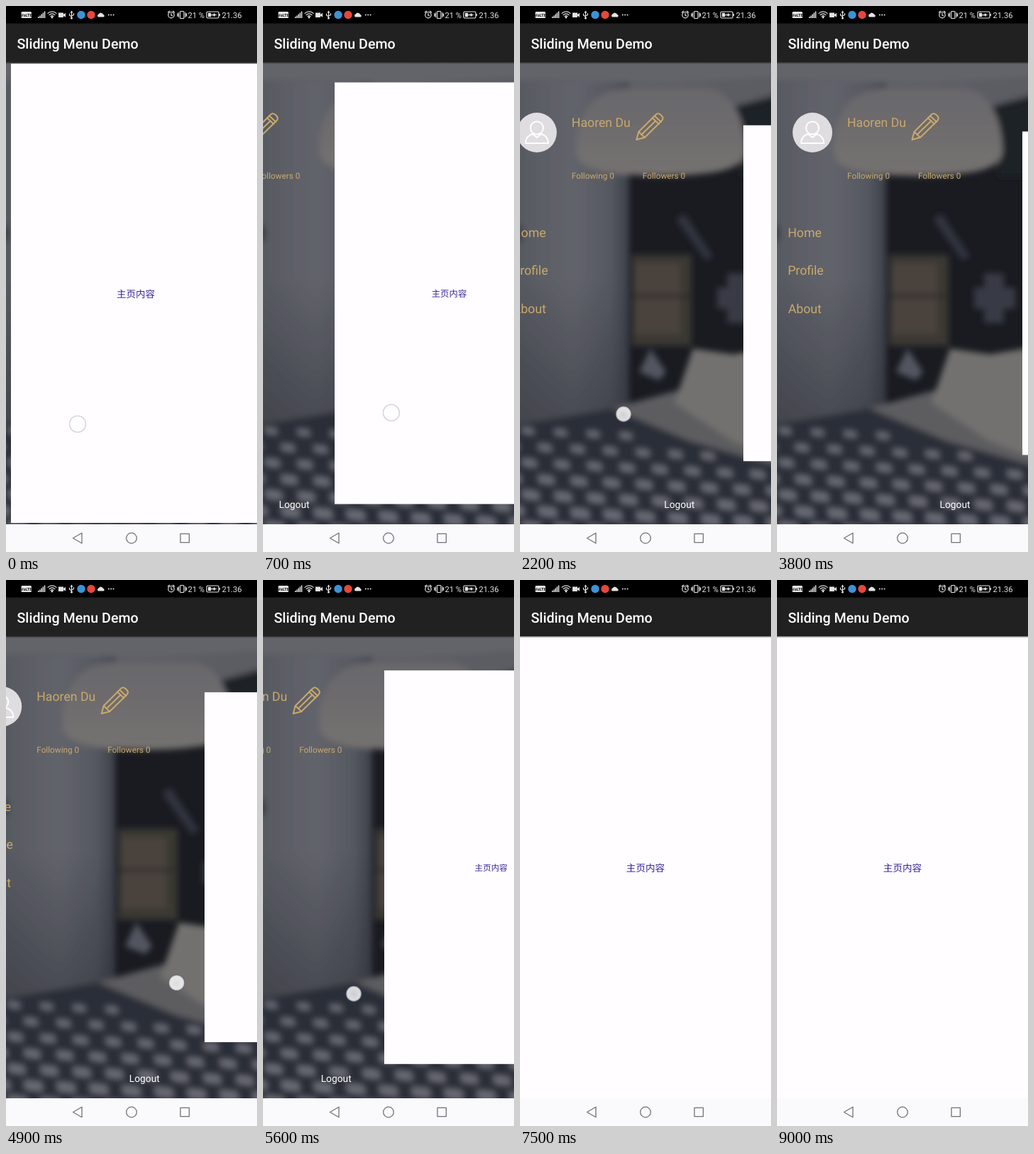
Write an HTML page that moves like this. It is 354 by 768 pixels and loops after 9.1 s.

```html
<!DOCTYPE html>
<html lang="en">
<head>
<meta charset="utf-8">
<title>Sliding Menu Demo</title>
<style>
  html, body { margin: 0; width: 100%; height: 100%; overflow: hidden; background: #000; }
  svg { display: block; width: 100vw; height: 100vh; }
  text { font-family: Roboto, "Noto Sans", sans-serif; text-rendering: geometricPrecision; }
  .gold { fill: #c9a96c; }
  .item { font-size: 17.7px; }
  .small { font-size: 11.8px; }
  .status { font-size: 11.2px; fill: #e4e4e4; }
  .line { fill: none; stroke-linecap: round; stroke-linejoin: round; }
</style>
</head>
<body>
<svg viewBox="0 0 354 768" preserveAspectRatio="none">
  <defs>
    <clipPath id="area"><rect y="79" width="354" height="650"/></clipPath>
    <filter id="soft" x="-10%" y="-10%" width="120%" height="120%"><feGaussianBlur stdDeviation="4"/></filter>
    <linearGradient id="wall">
      <stop offset="0" stop-color="#55575f"/>
      <stop offset=".55" stop-color="#62646b"/>
      <stop offset=".85" stop-color="#555861"/>
      <stop offset="1" stop-color="#3c4049"/>
    </linearGradient>
    <linearGradient id="fall" x2="0" y2="1">
      <stop offset="0" stop-color="#23262e" stop-opacity="0"/>
      <stop offset="1" stop-color="#23262e" stop-opacity=".45"/>
    </linearGradient>
    <linearGradient id="lamp" x2="0" y2="1">
      <stop offset="0" stop-color="#68676b"/>
      <stop offset="1" stop-color="#757270"/>
    </linearGradient>
    <linearGradient id="drop" x2="0" y2="1">
      <stop offset="0" stop-color="#000" stop-opacity=".4"/>
      <stop offset="1" stop-color="#000" stop-opacity="0"/>
    </linearGradient>
    <radialGradient id="spot">
      <stop offset="0" stop-color="#fff" stop-opacity=".76"/>
      <stop offset=".8" stop-color="#fff" stop-opacity=".84"/>
      <stop offset="1" stop-color="#fff" stop-opacity=".6"/>
    </radialGradient>
  </defs>

  <g clip-path="url(#area)">
    <!-- blurred room -->
    <rect y="79" width="354" height="650" fill="#191b21"/>
    <g filter="url(#soft)">
      <path d="M-20 60H374V122L300 142L240 232H-20Z" fill="#5b5c63"/>
      <path d="M-20 60H374V98L200 110L-20 102Z" fill="#63646a"/>
      <path d="M374 124L300 142L312 240H374Z" fill="#1f2128"/>
      <path d="M-20 108H154V600H-20Z" fill="url(#wall)"/>
      <path d="M-20 380H154V610H-20Z" fill="url(#fall)"/>
      <path d="M80 205C78 160 98 118 150 115H262C300 118 318 160 318 205C316 226 290 238 200 239C110 238 82 228 80 205Z" fill="url(#lamp)"/>
      <path d="M220 300L232 292L272 352L262 358Z" fill="#33363f"/>
      <path d="M158 350H242V478H158Z" fill="#3b3733"/>
      <path d="M163 362H226V462H163Z" fill="#48433d"/>
      <path d="M158 408H240" stroke="#292725" stroke-width="4"/>
      <path d="M292 376H320V396H336V426H320V446H292V426H278V396H292Z" fill="#373a44"/>
      <path d="M168 515L184 482L206 515L196 526Z" fill="#535761"/>
      <path d="M130 566L225 540L374 580V660L250 625Z" fill="#5d5d60"/>
      <path d="M218 558L244 482L300 490L374 478V640L300 612Z" fill="#737170"/>
      <path d="M-20 592L130 566L240 612L374 650V750H-20Z" fill="#2c2f38"/>
      <g id="quilt" fill="#696b75"/>
      <ellipse cx="-1" cy="320" rx="4" ry="13" fill="#2d2f36"/>
    </g>

    <g id="menu">
      <circle cx="50" cy="178" r="28" fill="#dfdde0"/>
      <g class="line" stroke="#fff" stroke-width="2">
        <circle cx="50" cy="171.500" r="9"/>
        <path d="M44 180C37 182 34 187 34 193H66C66 187 63 182 56 180L50 185Z"/>
      </g>
      <text class="gold item" x="99" y="170">Haoren Du</text>
      <g class="line" stroke="#c9a96c" stroke-width="2">
        <path d="M190.500 188L193.500 177L217 153.500Q220 149.500 224 152.500L226 154.500Q229.500 158 226 161.500L202 185Z"/>
        <path d="M193.500 177L202 185M213 157.500L222 166M216 154.500L225 163M198 180.500L217.500 161.500"/>
      </g>
      <text class="gold small" x="99" y="243">Following 0</text>
      <text class="gold small" x="199" y="243">Followers 0</text>
      <text class="gold item" x="15.200" y="325">Home</text>
      <text class="gold item" x="15.200" y="378">Profile</text>
      <text class="gold item" x="15.800" y="432">About</text>
      <text x="229.500" y="706" font-size="13.800" fill="#fff">Logout</text>
    </g>

    <g id="panel">
      <rect y="-325" width="354" height="650" fill="#fffdff"/>
      <text x="177" y="6" text-anchor="middle" font-size="13.600" fill="#3a2496"
        style="font-family:'Noto Sans CJK SC','Noto Sans CJK',sans-serif">主页内容</text>
    </g>
    <rect y="79" width="354" height="3" fill="url(#drop)"/>
  </g>

  <rect width="354" height="25" fill="#000"/>
  <rect y="24.500" width="354" height="54.800" fill="#212121"/>
  <text x="15.500" y="60" font-size="19.670" font-weight="500" fill="#fff">Sliding Menu Demo</text>

  <!-- status bar -->
  <g fill="#e4e4e4">
    <rect x="21.500" y="8" width="14.500" height="9" rx="1.500"/>
    <text x="28.750" y="14.700" text-anchor="middle" font-size="5.600" font-weight="700" fill="#111">VoLTE</text>
    <path d="M45 15h1.500v2H45zM47.200 13.500h1.500V17h-1.500zM49.400 11.500h1.500V17h-1.500zM51.600 9.500h1.500V17h-1.500zM53.800 7.500h1.500V17h-1.500z"/>
    <circle cx="65" cy="16" r="1.400"/>
    <path d="M74 9.500h7v6.500h-7zM81 12l3-2.200v6l-3-2.200z"/>
    <path d="M92.500 6.500l2 3h-4z"/>
    <circle cx="92.500" cy="17" r="1.500"/>
    <path d="M130 15.500a2.400 2.400 0 0 1 .8-4.200a3.600 3.600 0 0 1 6.400.6a2 2 0 0 1 .6 3.600z"/>
    <circle cx="144.800" cy="12.500" r="1"/><circle cx="148.200" cy="12.500" r="1"/><circle cx="151.600" cy="12.500" r="1"/>
    <path d="M285 9.700h4v5.600h-4zM300.500 11h1.500v3h-1.500zM288.500 12l4-.2 1-1.800 1.500 1.800 3 .7-3 .7-1.500 1.800-1-1.800-4-.2z"/>
  </g>
  <g class="line" stroke="#e4e4e4" stroke-width="1.200">
    <path d="M59 10.300a8.500 8.500 0 0 1 12 0M61 12.600a5.600 5.600 0 0 1 8 0M63 14.600a3 3 0 0 1 4 0"/>
    <path d="M92.500 8V16M89.500 11v2l3 2M95.500 10.500v2l-3 1.500"/>
    <circle cx="233" cy="12.700" r="4.200"/>
    <path d="M233 10.300v2.600l1.700 1M228.500 9l2-1.800M237.500 9l-2-1.800"/>
    <rect x="245.500" y="7.500" width="5.500" height="10" rx="1"/>
    <path d="M243.300 9.500v6M241.600 11l.8 1.500-.8 1.500M253.200 9.500v6M254.900 11l-.8 1.500.8 1.500"/>
    <rect x="283" y="8" width="17" height="9" rx="1.500"/>
  </g>
  <circle cx="106" cy="12.500" r="5.700" fill="#3b93d6"/>
  <circle cx="120" cy="12.500" r="5.700" fill="#e5473c"/>
  <text class="status" x="256.500" y="16.500">21 %</text>
  <text class="status" x="304.500" y="16.500">21.36</text>

  <!-- navigation bar -->
  <rect y="729" width="354" height="39" fill="#faf9fc"/>
  <g class="line" stroke="#737277" stroke-width="1.300">
    <path d="M94.500 748.500L107 741.300V755.700Z"/>
    <circle cx="177" cy="748.500" r="7.300"/>
    <rect x="246" y="742.300" width="12.400" height="12.400"/>
  </g>

  <g id="touch">
    <circle r="11.400" fill="none" stroke="#58508a" stroke-opacity=".24" stroke-width="1.700"/>
    <circle r="10.700" fill="url(#spot)"/>
  </g>
</svg>
<script>
  const LOOP = 9100, STEP = 100, OPEN = 346;
  const $ = id => document.getElementById(id);

  // [ms, left edge of the page]
  const slide = [
    [0, 7], [700, 101], [1000, 149], [2000, 249], [2200, 315], [2400, 338], [2700, OPEN],
    [4500, OPEN], [5500, 181], [5600, 171], [6500, 53], [6600, 37], [6800, 12], [7100, 0]
  ];

  // one list per finger press: [ms, x, y]
  const presses = [
    [[0, 101, 588], [700, 181, 572], [1000, 229, 565], [1600, 280, 558]],
    [[1900, 112, 580], [2200, 146, 574], [3000, 220, 561], [3300, 228, 559]],
    [[4600, 290, 560], [5500, 142, 580], [5600, 128, 582], [5900, 88, 588]],
    [[6200, 262, 545], [6600, 199, 553], [7000, 150, 562]]
  ];

  function at(keys, t, col = 1) {
    const i = keys.findIndex(k => k[0] > t);
    if (i < 0) return keys[keys.length - 1][col];
    if (i === 0) return keys[0][col];
    const a = keys[i - 1], b = keys[i];
    return a[col] + (b[col] - a[col]) * (t - a[0]) / (b[0] - a[0]);
  }

  function makeQuilt() {
    let d = "";
    for (let row = 0; row < 7; row++) {
      const size = 0.7 + row * 0.07;
      for (let col = -1; col < 9; col++) {
        const x = col * 46 + (row % 2) * 23 + 2;
        const y = 592 + row * 22 + x * 0.05;
        if (x > 150 && y < 560 + x * 0.25) continue;
        const w = 24 * size, h = 13 * size;
        d += `M${x} ${y}l${w} ${h * 0.2}l${w * 0.1} ${h}l${-w} ${-h * 0.2}z`;
      }
    }
    $("quilt").innerHTML = `<path d="${d}"/>`;
  }

  function draw(t) {
    const left = at(slide, t);
    const scale = 1 - 0.3 * left / OPEN;
    $("panel").setAttribute("transform", `translate(${left} 404) scale(${scale})`);
    $("menu").setAttribute("transform", `translate(${(left - OPEN) * 0.845} 0)`);

    const press = presses.find(p => t >= p[0][0] && t <= p[p.length - 1][0]);
    $("touch").style.display = press ? "" : "none";
    if (press) $("touch").setAttribute("transform", `translate(${at(press, t)} ${at(press, t, 2)})`);
  }

  const start = performance.now();
  function tick() {
    const t = (performance.now() - start) % LOOP;
    draw(Math.floor(t / STEP) * STEP);
    requestAnimationFrame(tick);
  }

  makeQuilt();
  tick();
</script>
</body>
</html>
```
